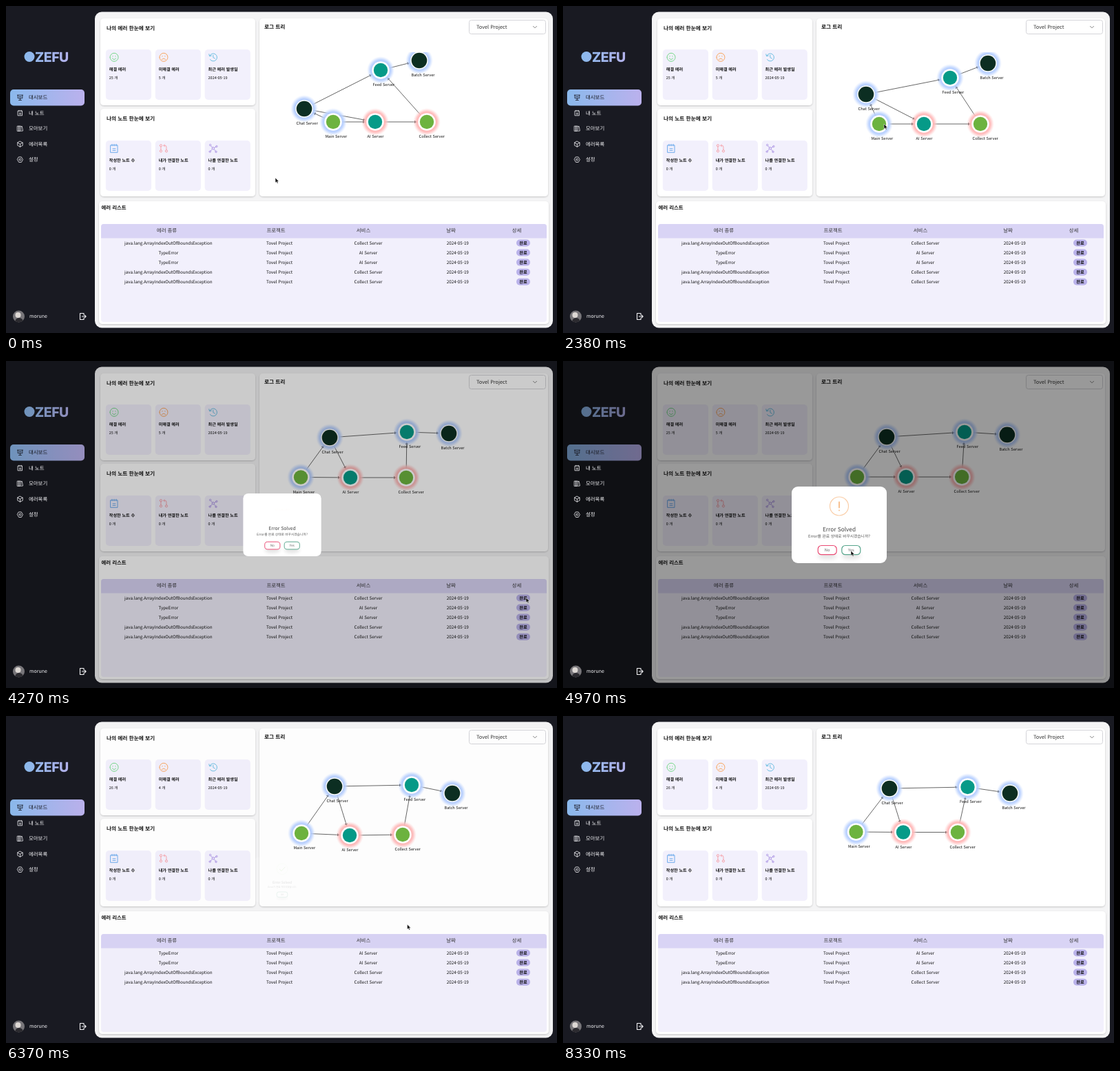
Recreate the animation shown at these times as an HTML page. Size 800 px wide and 474 px high, loop 8400 ms.

```html
<!DOCTYPE html>
<html lang="ko">
<head>
<meta charset="utf-8">
<style>
html, body { margin: 0; width: 100%; height: 100%; overflow: hidden; background: #191a22; }
svg { display: block; width: 100%; height: 100%; }
text { font-family: "Noto Sans CJK KR", "Noto Sans CJK", "Noto Sans", sans-serif; text-rendering: geometricPrecision; }
</style>
</head>
<body>
<svg id="stage" viewBox="0 0 800 474">
  <defs>
    <linearGradient id="active"><stop stop-color="#8bb9ec"/><stop offset="1" stop-color="#bbb1ed"/></linearGradient>
    <linearGradient id="brand" gradientUnits="userSpaceOnUse" x1="27" x2="92"><stop stop-color="#8bb9ec"/><stop offset="1" stop-color="#b4b2ec"/></linearGradient>
    <radialGradient id="blue"><stop offset=".6" stop-color="#a9c6ff"/><stop offset=".78" stop-color="#bed4ff" stop-opacity=".85"/><stop offset="1" stop-color="#d5e3ff" stop-opacity="0"/></radialGradient>
    <radialGradient id="red"><stop offset=".6" stop-color="#ffa9a9"/><stop offset=".78" stop-color="#ffc0c0" stop-opacity=".85"/><stop offset="1" stop-color="#ffdada" stop-opacity="0"/></radialGradient>
    <filter id="shadow" x="-10%" y="-10%" width="120%" height="125%"><feDropShadow dx="0" dy="1" stdDeviation="1.2" flood-opacity=".2"/></filter>
    <filter id="soft" x="-50%" y="-100%" width="200%" height="300%"><feGaussianBlur stdDeviation="3"/></filter>
    <marker id="arrow" viewBox="0 0 4 4" refX="4" refY="2" markerWidth="4" markerHeight="4" markerUnits="userSpaceOnUse" orient="auto"><path d="M0 0L4 2L0 4z" fill="#222"/></marker>
    <clipPath id="tree"><rect x="370" y="67" width="416" height="208"/></clipPath>
    <clipPath id="face"><circle cx="18.5" cy="450" r="8.5"/></clipPath>
  </defs>
  <g id="page"></g>
  <g id="graph" clip-path="url(#tree)"></g>
  <rect id="backdrop" width="800" height="474"/>
  <g id="menu"></g>
  <g id="ask"></g>
  <g id="done"></g>
  <path id="cursor" d="M0 0V7.2L1.7 5.7L2.9 8.2L4.1 7.6L3 5.2H5.2z" fill="#111" stroke="#fff" stroke-width=".5"/>
</svg>
<script>
const LOOP = 8400, STEP = 70;
const ASK_OPEN = 4240, ASK_CLOSE = 5100, UPDATE = 5180, DONE_OPEN = 5222, DONE_CLOSE = 6290;
const $ = id => document.getElementById(id);

function el(parent, tag, attrs, content = "") {
  const node = document.createElementNS("http://www.w3.org/2000/svg", tag);
  set(node, attrs);
  node.textContent = content;
  return parent.appendChild(node);
}
function set(node, attrs) {
  for (const key in attrs) node.setAttribute(key, attrs[key]);
}
// y is the visual middle of the line
function label(parent, content, x, y, size, opts = {}) {
  return el(parent, "text", { x, y: y + size * .37, "font-size": size, fill: "#111", ...opts }, content);
}
const box = (parent, x, y, width, height, rx, fill, opts) =>
  el(parent, "rect", { x, y, width, height, rx, fill, ...opts });
const disc = (parent, cx, cy, r, fill, opts) => el(parent, "circle", { cx, cy, r, fill, ...opts });
const stroke = (parent, d, color, width = 1, opts) =>
  el(parent, "path", { d, fill: "none", stroke: color, "stroke-width": width, "stroke-linecap": "round", "stroke-linejoin": "round", ...opts });
const icon = (parent, x, y, d, color, width) => stroke(parent, d, color, width, { transform: `translate(${x} ${y})` });
const ring = r => `M${-r} 0a${r} ${r} 0 1 1 ${2 * r} 0a${r} ${r} 0 1 1 ${-2 * r} 0`;
const MIDDLE = { "text-anchor": "middle" }, BOLD = { "font-weight": 700 };

const page = $("page");
let solved, unsolved, rows;

function buildSidebar() {
  const menu = $("menu");
  box(page, 0, 0, 800, 474, 0, "#191a22");
  disc(page, 34, 73.5, 7.5, "url(#brand)");
  el(page, "text", { x: 42, y: 80.5, "font-size": 19.5, "font-weight": 800, fill: "url(#brand)", style: "font-family:Inter,sans-serif;letter-spacing:-.5px" }, "ZEFU");
  box(page, 6, 121, 108, 23.5, 5, "url(#active)");
  const items = [
    ["대시보드", "M-4 -3.5H4M-3.3 -3.5V1H3.3V-3.5M0 1V3.5M-2 3.8H2M-1.5 -1.2H1.5"],
    ["내 노트", "M-3 -3.2H3V3.6H-3zM-1.5 -4V-2.7M1.5 -4V-2.7M-1.2 0H1.2M-1.2 1.7H1.2"],
    ["모아보기", "M-3.8 -3.6H-1.4V3.6H-3.8zM-1.4 -3.6H1V3.6H-1.4zM1.2 -2.8L2.8 -3.3L4 3.2L2.2 3.6"],
    ["에러목록", "M0 -4L3.7 -2V2L0 4L-3.7 2V-2zM-3.7 -2L0 0L3.7 -2M0 0V4"],
    ["설정", "M-1.8 -3.8H1.8L4 0L1.8 3.8H-1.8L-4 0z" + ring(1.5)]
  ];
  items.forEach(([name, d], i) => {
    const y = 132.7 + i * 22.5, color = i ? "#f2f2f5" : "#15161d";
    icon(menu, 20.5, y, d, color, .8);
    label(menu, name, 33, y - .3, 7.4, { fill: color, "font-weight": i ? 400 : 500 });
  });
  const face = el(menu, "g", { "clip-path": "url(#face)" });
  box(face, 8, 440, 22, 20, 0, "#777579");
  disc(face, 17.5, 448, 4, "#ddd8d4");
  el(face, "ellipse", { cx: 19, cy: 458, rx: 6, ry: 6, fill: "#2b2a2f" });
  label(menu, "morune", 34, 449.5, 7, { fill: "#f2f2f5" });
  icon(menu, 111.5, 450, "M1.5 -2V-4.5H-4V4.5H1.5V2M-1.2 0H4.5M2.8 -1.8L4.6 0L2.8 1.8", "#f2f2f5", 1.1);
}

function buildCards() {
  box(page, 129, 8.5, 665, 458, 10, "#f4f4f5");
  const card = (x, y, w, h) => box(page, x, y, w, h, 5, "#fff", { filter: "url(#shadow)" });
  card(137, 18, 225, 126);
  card(137, 149, 225, 127);
  card(368, 18, 419, 258);
  card(135, 283, 653, 178);
  label(page, "나의 에러 한눈에 보기", 146, 32, 7.7, BOLD);
  label(page, "나의 노트 한눈에 보기", 146, 163.5, 7.7, BOLD);
  label(page, "로그 트리", 375, 30.5, 7.7, BOLD);
  label(page, "에러 리스트", 138.5, 292, 7.4, BOLD);
  box(page, 672.5, 20.5, 111, 20, 3, "#fff", { stroke: "#d4d4d8", "stroke-width": 1 });
  label(page, "Tovel Project", 683, 30.2, 7.3, { fill: "#333" });
  icon(page, 768, 30.5, "M-2.5 -1.2L0 1.3L2.5 -1.2", "#777", .9);

  const eyes = ring(6) + "M-2 -1.8V-1.3M2 -1.8V-1.3";
  const tiles = [
    ["해결 에러", "25 개", "#78d98b", eyes + "M-2.8 1.5Q0 5 2.8 1.5"],
    ["미해결 에러", "5 개", "#f9a660", eyes + "M-2.8 3.4Q0 .2 2.8 3.4"],
    ["최근 에러 발생일", "2024-05-19", "#6cbfe2", "M-5 -2A5.5 5.5 0 1 1 -4.5 3.2M-6 -4.5L-5.3 -1.6L-2.4 -2.3M0 -3V.3L2.5 1.8"],
    ["작성한 노트 수", "0 개", "#6eabec", "M-5 -4.5H5V6H-5zM-3 -6V-3.5M0 -6V-3.5M3 -6V-3.5M-2 .5H2M-2 3H2"],
    ["내가 연결한 노트", "0 개", "#f6a3ab", "M-4 -2.5V2.5M4 2.5V-2Q4 -4 2 -4H0M1.5 -5.5L0 -4L1.5 -2.5" + ["-5.6 -4", "-5.6 4", "2.4 4"].map(p => `M${p}a1.6 1.6 0 1 1 3.2 0a1.6 1.6 0 1 1 -3.2 0`).join("")],
    ["나를 연결한 노트", "0 개", "#b09ae6", ring(1.7) + "M-1.2 -1.2L-3.5 -3.8M1.5 -.8L4 -2M-1.3 1.2L-4 4M1.3 1.2L3.5 4" + ["-5.4 -4.8", "3.8 -2.8", "-5.8 4.8", "3 5"].map(p => `M${p}a1.2 1.2 0 1 1 2.4 0a1.2 1.2 0 1 1 -2.4 0`).join("")]
  ];
  const values = tiles.map(([name, value, color, d], i) => {
    const x = 144.8 + i % 3 * 71.9, y = i < 3 ? 63 : 195;
    box(page, x, y, 66.2, 73, 5, "#f2f0fc");
    icon(page, x + 12.2, y + 11.3, d, color, 1);
    label(page, name, x + 5, y + 28.6, 6.15, BOLD);
    return label(page, value, x + 5, y + 41, 5.45);
  });
  [solved, unsolved] = values;
}

function buildTable() {
  box(page, 138, 316, 647, 142, 4, "#f2f0fc");
  el(page, "path", { d: "M138 336.5V320q0-4 4-4H781q4 0 4 4V336.5z", fill: "#d9d4f5" });
  const columns = [["에러 종류", 233.5], ["프로젝트", 392], ["서비스", 519], ["날짜", 646], ["상세", 741.5]];
  columns.forEach(([name, x]) => label(page, name, x, 325.7, 7.4, { ...MIDDLE, fill: "#333", "font-weight": 500 }));
  const bounds = ["java.lang.ArrayIndexOutOfBoundsException", "Collect Server"], type = ["TypeError", "AI Server"];
  rows = [bounds, type, type, bounds, bounds].map(([error, service], i) => {
    const row = el(page, "g", {}), y = 343.5 + i * 14.05;
    [[error, 235.8], ["Tovel Project", 397], [service, 526], ["2024-05-19", 655.8]]
      .forEach(([content, x]) => label(row, content, x, y, 6.25, MIDDLE));
    box(row, 741, y - 5, 20, 10, 5, "#bab2ea");
    label(row, "완료", 751, y - .2, 6.2, { ...MIDDLE, ...BOLD });
    return row;
  });
}

// node positions at each of TIMES
const TIMES = [0, 2380, 3640, 4270, UPDATE, 5390, 6370, 8330];
const NODES = {
  Chat: ["#0c2e22", "blue", 433, 149, 440, 128, 470, 112, 470, 111, 470, 110, 482, 98, 477, 102, 474, 105],
  Main: ["#6db33f", "blue", 475, 168, 459, 171, 429, 170, 428, 168.5, 427, 168, 436, 173, 429, 170, 425.5, 168],
  AI: ["#069a88", "red", 536, 168, 524, 171, 503, 170, 500, 169, 498, 168, 512, 182, 499, 173, 494, 168.5],
  Collect: ["#6db33f", "red", 611, 168, 606, 171, 584, 170, 581, 169, 579, 168, 586, 179, 576, 172, 573, 168.5],
  Feed: ["#069a88", "blue", 544, 93, 562, 104, 580, 104, 582, 103, 583, 103, 593, 93, 589, 100, 587.5, 103],
  Batch: ["#0c2e22", "blue", 600, 79, 617, 83, 641.5, 101, 643, 105, 645, 107, 646, 111.5, 648, 112, 649, 112]
};
const EDGES = ["Chat Feed", "Chat AI", "Main Chat", "Main AI", "AI Collect", "Collect Feed", "Feed Batch"].map(e => e.split(" "));
const SHAPES = {};
let lines;

function buildGraph() {
  const graph = $("graph");
  lines = EDGES.map(() => el(graph, "line", { stroke: "#333", "stroke-width": .75, "marker-end": "url(#arrow)" }));
  for (const name in NODES) {
    const [color, halo] = NODES[name], g = SHAPES[name] = el(graph, "g", {});
    disc(g, 0, 0, 20, `url(#${halo})`);
    disc(g, 0, 0, 12.8, "#fff");
    disc(g, 0, 0, color === "#0c2e22" ? 11.3 : 10.2, color);
  }
  for (const name in NODES) SHAPES[name].caption = label(graph, name + " Server", 0, 0, 5.7);
}

function buildModal(g, message, buttons) {
  box(g, -69, -55.5, 138, 111, 9, "#fff");
  label(g, "Error Solved", 0, 6.3, 8.3, { ...MIDDLE, fill: "#444" });
  label(g, message, 0, 16.8, 5.75, { ...MIDDLE, fill: "#555" });
  buttons.forEach(([name, x, color]) => {
    el(g, "ellipse", { cx: x, cy: 45, rx: 14, ry: 5, fill: "#000", opacity: .1, filter: "url(#soft)" });
    box(g, x - 13.5, 30, 27, 13.2, 5, "#fff", { stroke: color, "stroke-width": 1.2 });
    label(g, name, x, 36.5, 5.8, { ...MIDDLE, fill: "#666" });
  });
}

buildSidebar();
buildCards();
buildTable();
buildGraph();
const GREEN = "#57a58c";
buildModal($("ask"), "Error를 완료 상태로 바꾸시겠습니까?", [["No", -17.3, "#ea4b74"], ["Yes", 17.3, GREEN]]);
buildModal($("done"), "Error가 완료 처리되었습니다.", [["OK", 0, GREEN]]);
const warning = el($("ask"), "g", {});
disc(warning, 0, 0, 13.5, "none", { stroke: "#facea8", "stroke-width": 1.2 });
stroke(warning, "M0 -6V2M0 6V6.1", "#f8bb86", 1.8);
disc($("done"), 0, -27, 13.5, "none", { stroke: "#a5dc86", "stroke-opacity": .35, "stroke-width": 1 });
const tick = stroke($("done"), "M-6.5 -26.5L-2 -22L7 -31.5", "#a5dc86", 1.6, { pathLength: 1, "stroke-dasharray": "1 2" });

const clamp = x => Math.max(0, Math.min(1, x));
const mix = (a, b, k) => a + (b - a) * k;
const smooth = k => k * k * (3 - 2 * k);
const easeOut = k => 1 - (1 - k) ** 2;

// CSS "ease": cubic-bezier(.25, .1, .25, 1)
function ease(x) {
  const curve = (a, b, s) => 3 * a * s * (1 - s) ** 2 + 3 * b * s * s * (1 - s) + s ** 3;
  let low = 0, high = 1;
  for (let i = 0; i < 20; i++) {
    const s = (low + high) / 2;
    if (curve(.25, .25, s) < x) low = s; else high = s;
  }
  return curve(.1, 1, low);
}

function popScale(k) {
  if (k < .45) return mix(.7, 1.05, ease(k / .45));
  if (k < .8) return mix(1.05, .95, ease((k - .45) / .35));
  return mix(.95, 1, ease((k - .8) / .2));
}

// returns how far the backdrop behind the modal has faded in
function showModal(g, t, open, close) {
  const out = ease(clamp((t - close) / 150));
  const scale = t < close ? popScale(clamp((t - open) / 300)) : mix(1, .5, out);
  const visible = t >= open && out < .99;
  set(g, { display: visible ? "inline" : "none", opacity: 1 - out, transform: `translate(401 237.5) scale(${scale})` });
  return ease(clamp((t - open) / 100)) * (1 - ease(clamp((t - close) / 100)));
}

function segment(times, t) {
  let i = 0;
  while (i < times.length - 2 && t >= times[i + 1]) i++;
  return [i, clamp((t - times[i]) / (times[i + 1] - times[i]))];
}

function drawGraph(t) {
  let [i, k] = segment(TIMES, t);
  if (i > 0) k = easeOut(k);
  const at = {};
  for (const name in NODES) {
    const p = NODES[name].slice(2 + i * 2, 6 + i * 2);
    const x = mix(p[0], p[2], k), y = mix(p[1], p[3], k);
    at[name] = [x, y];
    set(SHAPES[name], { transform: `translate(${x} ${y})` });
    set(SHAPES[name].caption, { x: x - 11.5, y: y + 23.2 });
  }
  EDGES.forEach(([from, to], n) => {
    const [x1, y1] = at[from], [x2, y2] = at[to];
    const cut = 1 - 14 / Math.hypot(x2 - x1, y2 - y1);
    set(lines[n], { x1, y1, x2: mix(x1, x2, cut), y2: mix(y1, y2, cut) });
  });
}

const POINTER = [
  [0, 391, 249], [400, 391, 249], [1100, 475, 169], [2380, 466, 171],
  [2800, 449, 171], [3640, 715, 370], [4060, 755, 343], [4400, 755, 343], [4850, 418, 275],
  [5110, 418, 275], [5390, 436.5, 285], [6160, 582.5, 302], [6370, 582.5, 302], [6860, 806, 330]
];

function drawPointer(t) {
  const [i, k] = segment(POINTER.map(p => p[0]), t), a = POINTER[i], b = POINTER[i + 1];
  set($("cursor"), { transform: `translate(${mix(a[1], b[1], smooth(k))} ${mix(a[2], b[2], smooth(k))})` });
}

function draw(t) {
  const updated = t >= UPDATE;
  solved.textContent = updated ? "26 개" : "25 개";
  unsolved.textContent = updated ? "4 개" : "5 개";
  rows.forEach((row, i) => set(row, {
    display: updated && i === 0 ? "none" : "inline",
    transform: `translate(0 ${updated ? -14.05 : 0})`
  }));
  drawGraph(t);
  const dim = Math.max(showModal($("ask"), t, ASK_OPEN, ASK_CLOSE), showModal($("done"), t, DONE_OPEN, DONE_CLOSE));
  set($("backdrop"), { opacity: .4 * dim });
  const flip = ease(clamp((t - ASK_OPEN) / 500));
  set(warning, { opacity: flip, transform: `translate(0 -27) scale(1 ${Math.cos((1 - flip) * 1.745)})` });
  const drawn = clamp((t - DONE_OPEN - 400) / 200);
  set(tick, { "stroke-dashoffset": 1 - drawn, opacity: drawn > 0 ? 1 : 0 });
  drawPointer(t);
}

const start = performance.now();
function frame() {
  const t = (performance.now() - start) % LOOP;
  draw(Math.floor(t / STEP) * STEP);
  requestAnimationFrame(frame);
}
frame();
</script>
</body>
</html>
```
